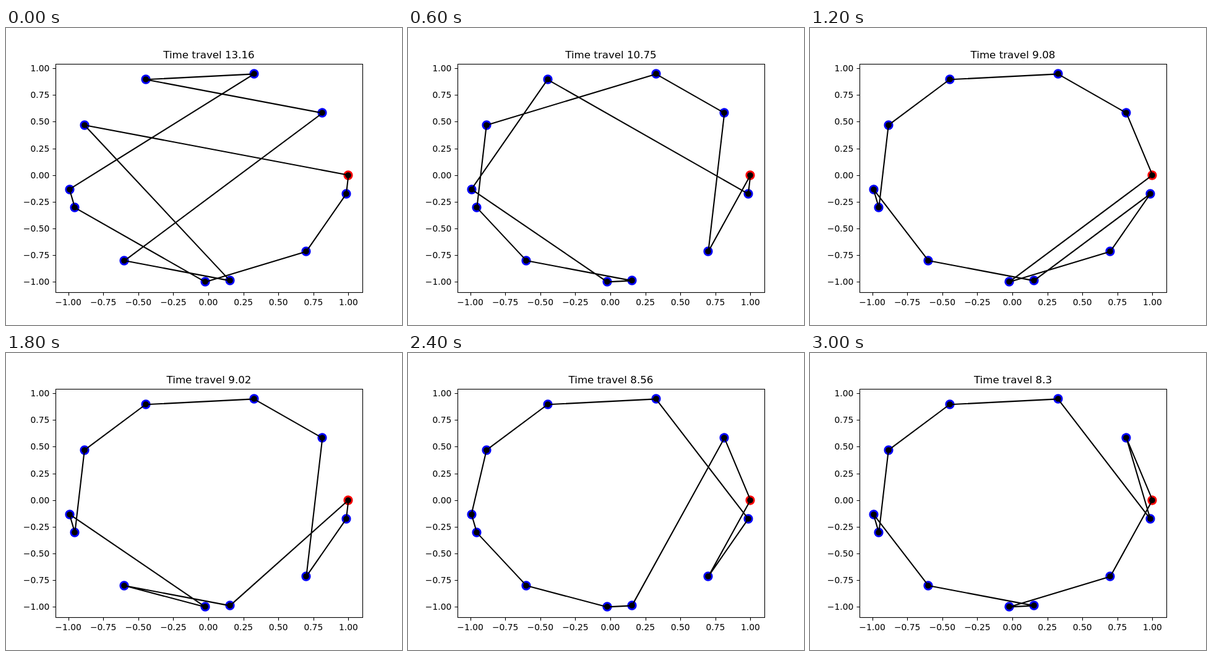
An HTML page for the animation above (3600 ms loop, 640 by 480 pixels).

```html
<!DOCTYPE html>
<html lang="en">
<head>
<meta charset="utf-8">
<title>Time travel</title>
<style>
  html, body { margin: 0; width: 100%; height: 100%; overflow: hidden; background: #fff; }
  svg { display: block; }
  text { font: 13.889px "DejaVu Sans", sans-serif; }
  #title { font-size: 16.667px; }
</style>
</head>
<body>
<svg id="plot" width="640" height="480" viewBox="0 0 640 480"></svg>
<script>
const STEP = 600;
const TOURS = [
  ['13.16', '0 7 1 6 4 3 8 11 2 10 5 9'],
  ['10.75', '0 9 3 11 10 1 6 2 7 8 4 5'],
  ['9.08', '0 4 8 3 7 2 11 6 1 9 5 10'],
  ['9.02', '0 9 5 4 8 3 7 2 11 10 6 1'],
  ['8.56', '0 4 1 10 6 2 11 7 3 8 9 5'],
  ['8.3', '0 4 9 8 3 7 2 11 6 1 10 5']
];

const plot = document.getElementById('plot');

function add(tag, attrs, content = '') {
  const el = document.createElementNS('http://www.w3.org/2000/svg', tag);
  for (const key in attrs) el.setAttribute(key, attrs[key]);
  el.textContent = content;
  return plot.appendChild(el);
}

// Maps data values to pixels, leaving a 5% margin at both ends
function makeScale(values, from, to) {
  const min = Math.min(...values), max = Math.max(...values);
  const pad = (max - min) * 0.05;
  return v => from + (v - min + pad) / (max - min + 2 * pad) * (to - from);
}

// Cities sit on the unit circle, 30 radians apart
const cities = Array.from({ length: 12 }, (_, i) => [Math.cos(30 * i), Math.sin(30 * i)]);
const sx = makeScale(cities.map(c => c[0]), 80, 576);
const sy = makeScale(cities.map(c => c[1]), 427.2, 57.6);
const points = cities.map(([x, y]) => [sx(x), sy(y)]);

function dots(radius, color) {
  points.forEach(([x, y], i) =>
    add('circle', { cx: Math.round(x), cy: Math.round(y), r: radius, fill: color(i) }));
}

dots(7.64, i => i ? '#00f' : '#f00');
const route = add('path', {
  fill: 'none', stroke: '#000', 'stroke-width': 2.083, 'stroke-linejoin': 'round'
});
dots(4.86, () => '#000');

const axisLine = { fill: 'none', stroke: '#000', 'stroke-width': 1.111 };
add('rect', { x: 80.5, y: 58.5, width: 496, height: 369, ...axisLine });

for (let v = -1; v <= 1; v += 0.25) {
  const label = v.toFixed(2).replace('-', '\u2212');
  const x = Math.round(sx(v)), y = Math.round(sy(v));
  add('path', { d: `M${x + 0.5} 427.5v5M80.5 ${y + 0.5}h-5`, ...axisLine });
  add('text', { x: sx(v), y: 448, 'text-anchor': 'middle' }, label);
  add('text', { x: 70.3, y: y + 5, 'text-anchor': 'end' }, label);
}

const title = add('text', { id: 'title', x: 328, y: 49, 'text-anchor': 'middle' });

let shown = -1;
function show(index) {
  if (index === shown) return;
  shown = index;
  const [length, order] = TOURS[index];
  title.textContent = 'Time travel ' + length;
  route.setAttribute('d', 'M' + order.split(' ').map(i => points[i].join(' ')).join('L') + 'Z');
}

const start = performance.now();
function tick() {
  show(Math.floor((performance.now() - start) / STEP) % TOURS.length);
  requestAnimationFrame(tick);
}
tick();
</script>
</body>
</html>
```
